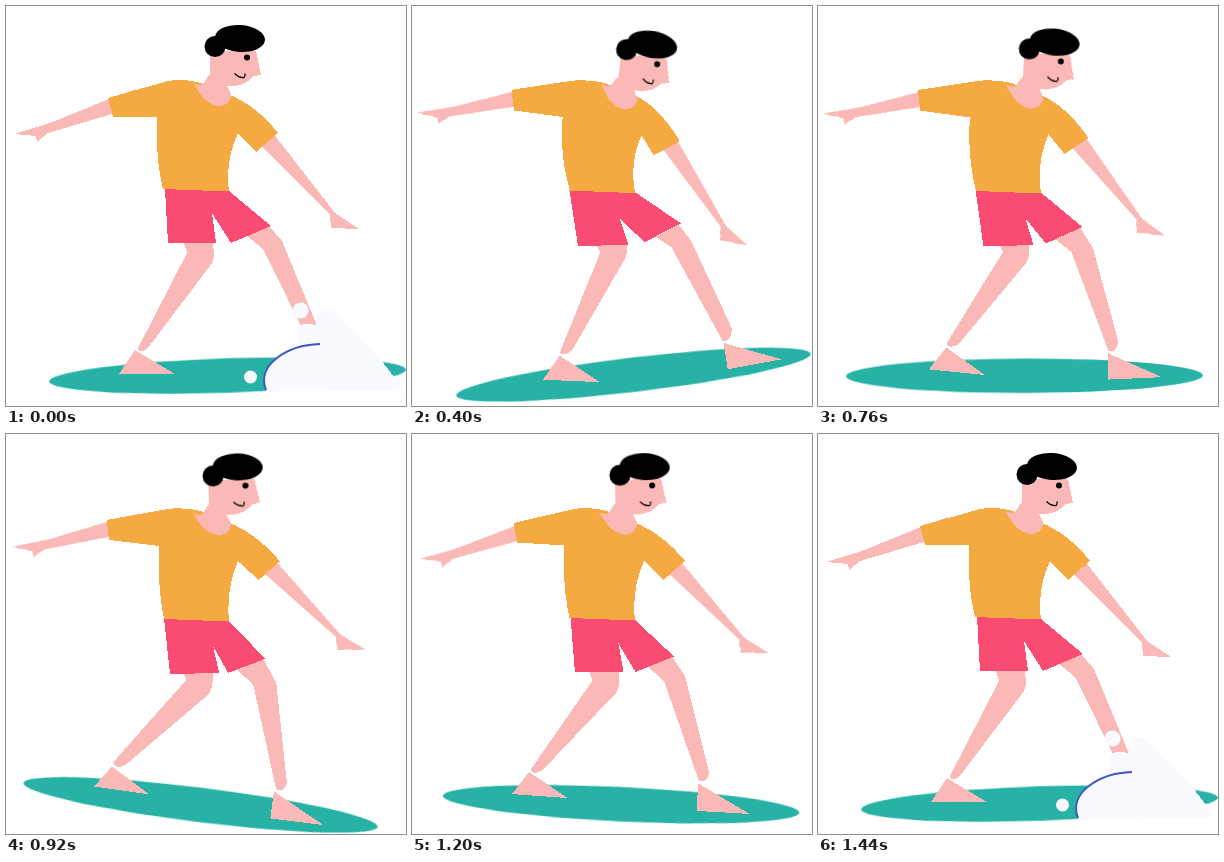
Animation of 400x400 px, one loop 1.48 s. Source, as an HTML page without scripts:

```html
<!DOCTYPE html>
<html lang="en">
<head>
<meta charset="utf-8">
<title>Surfer</title>
<style>
  html, body { margin: 0; width: 100%; height: 100%; overflow: hidden; background: #fff; }
  svg { display: block; width: 100%; height: 100%; shape-rendering: crispEdges; }
  ellipse, circle, .line { shape-rendering: auto; }

  .skin { fill: #fab8b6; }
  .shirt { fill: #f4a941; }
  .shorts { fill: #fa4b73; }
  .board { fill: #27b2a5; }
  .splash { fill: #f8faff; }
  .line { fill: none; stroke-width: 1.3; stroke: #000; }

  /* Poses: neutral at 0 ms, lean back at 560 ms, lean forward at 960 ms, neutral from 1440 ms. */
  .move { animation: 1480ms cubic-bezier(.37, 0, .63, 1) infinite; }
  .slide { animation: slide 1480ms linear infinite; }
  .board { animation-name: tilt; transform-origin: 221.5px 369.5px; }
  .head { animation-name: nod; transform-origin: 210px 90px; }
  .back-arm { animation-name: back-arm; transform-origin: 160px 90px; }
  .front-arm { animation-name: front-arm; transform-origin: 232px 110px; }
  .shirt { animation-name: shirt; }
  .shorts { animation-name: shorts; }
  .back-leg { animation-name: back-leg; }
  .back-foot { animation-name: back-foot; }
  .front-leg { animation-name: front-leg; }
  .front-foot { animation-name: front-foot; }
  .splash { animation: splash 1480ms step-end infinite; }

  @keyframes slide {
    0%, 37.84%, 97.29%, to { transform: none; }
    62.16% { transform: translateX(-27px); }
  }
  @keyframes tilt {
    0%, 97.29%, to { transform: rotate(-1.9deg); }
    37.84% { transform: translateY(-1px) rotate(-7.8deg); }
    64.86% { transform: translateY(1.5px) rotate(7.4deg); }
  }
  @keyframes nod {
    0%, 97.29%, to { transform: translateY(0) rotate(0); }
    37.84% { transform: translateY(3.6px) rotate(8deg); }
    64.86% { transform: translateY(1.3px) rotate(-2.5deg); }
  }
  @keyframes back-arm {
    0%, 97.29%, to { transform: rotate(0); }
    37.84% { transform: rotate(9.7deg); }
    64.86% { transform: rotate(5.5deg); }
    81.08% { transform: rotate(1.1deg); }
  }
  @keyframes front-arm {
    0%, 97.29%, to { transform: rotate(0); }
    37.84% { transform: rotate(10.2deg); }
    64.86% { transform: rotate(-3.8deg); }
  }
  @keyframes shirt {
    0%, 97.29%, to { d: path("M102 92L162 75Q178 72 195 77L222 88Q251 100 272 127L250 146L232 127Q219 155 223 185.500L157 183Q149 150 151.500 111L107 111Z"); }
    37.84% { d: path("M99 82L157 75Q176 73 192 77L220 88Q245 99 267 137L240 150L229 130Q217 155 223 187.500L158 185Q147 148 150.500 111L101 103Z"); }
    64.86% { d: path("M101 86L162 75Q178 73 195 77L222 88Q251 100 274 127L253 146L232 127Q220 155 223 187.500L158 185Q151 150 153.500 112L103 106Z"); }
  }
  @keyframes shorts {
    0%, 97.29%, to { d: path("M159 182L162 237L210 237L206 207L225 237L265 220L223 185Z"); }
    37.84% { d: path("M157 184L167 241L218 239L208 213L234 236L270 217L224 187Z"); }
    64.86% { d: path("M158 184L164 240L213 239L207 212L222 239L259 225L223 187Z"); }
  }
  @keyframes back-leg {
    0%, 97.29%, to { d: path("M177 234L181 247L132 342Q132 349 142 342L206 257L208 251L207 234Z"); }
    37.84% { d: path("M184 236L190 246L152 346Q152 353 164 345L214 253L217 245L216 236Z"); }
    64.86% { d: path("M176 237L180 246L106 328Q108 335 118 331L203 260L206 252L207 236Z"); }
  }
  @keyframes back-foot {
    0%, 97.29%, to { d: path("M129 344L113 368L169 368Z"); }
    37.84% { d: path("M152 351L135 375L192 378Z"); }
    64.86% { d: path("M105 332L87 352L142 360Z"); }
  }
  @keyframes front-leg {
    0%, 97.29%, to { d: path("M240 229L263 220L276 235L314 327Q315 340 304 338L257 243Z"); }
    37.84% { d: path("M244 231L268 219L280 235L321 321Q321 335 312 334L260 241Z"); }
    64.86% { d: path("M231 236L257 225L270 249L280 350Q275 361 269 355L247 251Z"); }
  }
  @keyframes front-foot {
    0%, 97.29%, to { d: path("M305 341L306 369L359 368Z"); }
    37.84% { d: path("M313 336L318 362L372 350Z"); }
    64.86% { d: path("M267 358L263 385L316 392Z"); }
  }
  @keyframes splash {
    0%, 97.29% { visibility: visible; }
    2.7% { visibility: hidden; }
  }
</style>
</head>
<body>
<svg viewBox="0 0 400 400">
  <g class="slide">
    <ellipse class="move board" cx="221.5" cy="369.5" rx="178.5" ry="17.2"/>
  </g>

  <g class="skin">
    <path class="move back-foot"/>
    <path class="move front-foot"/>
    <path class="move back-leg"/>
    <path class="move front-leg"/>
    <path class="move back-arm" d="M130 83L103 93L44 117L8 128L30 130L31 136L42 127L106 108L140 100Z"/>
    <path class="move front-arm" d="M240 118L257 142L324 209L325 222L353 223L329 207L326 203L270 131L252 112Z"/>
  </g>

  <path class="move shorts"/>
  <path class="move shirt"/>

  <g class="move head">
    <path class="skin" d="M188 78Q199 99 213 100Q225 99 225 88L221 80Q240 81 247 70L255 69L250 45L204 45V68L196 79Z"/>
    <circle cx="209" cy="40.5" r="10.5"/>
    <ellipse cx="234" cy="32.5" rx="25" ry="13.5" transform="rotate(4 234 32.5)"/>
    <circle cx="241" cy="51.5" r="3"/>
    <path class="line" d="M228.5 67.5Q233 72 238 71.500Q239.5 70.500 239 67.500"/>
  </g>

  <g class="splash">
    <path d="M260 385C251 358 280 344 292 334Q288 317 303 318L311 319Q308 306 320 303Q327 304 333 311C355 332 372 348 388 371L397 381L390 384Z"/>
    <circle cx="294.5" cy="304.5" r="8"/>
    <circle cx="244.5" cy="371" r="6.5"/>
    <path class="line" d="M260 384C250 359 281 339 314 338" style="stroke: #3c57c4; stroke-width: 2"/>
  </g>
</svg>
</body>
</html>
```
